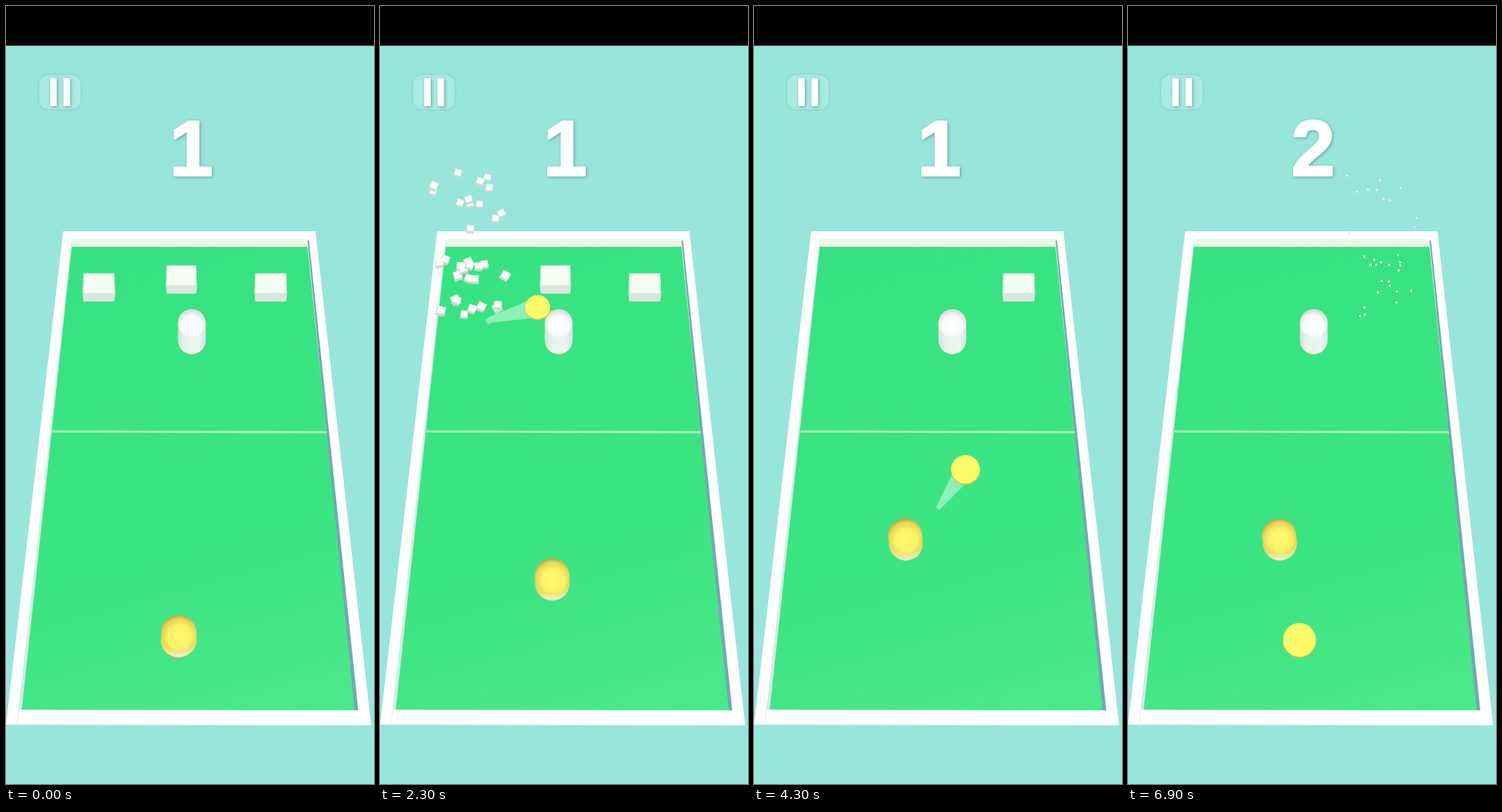
Recreate the animation shown at these times as an HTML page. Size 515x1088 px, loop 7000 ms.

```html
<!DOCTYPE html>
<html lang="en">
<head>
<meta charset="utf-8">
<title>Table game</title>
<style>
  html, body { margin: 0; width: 100%; height: 100%; overflow: hidden; background: #98e5dc; }
  svg { display: block; width: 100vw; height: 100vh; }
  text { font: bold 110px "Liberation Sans", Arial, sans-serif; text-anchor: middle; }
</style>
</head>
<body>
<svg viewBox="0 0 515 1088">
  <defs>
    <linearGradient id="grass" x1="0.4" y1="0" x2="0.6" y2="1">
      <stop offset="0" stop-color="#37e282"/>
      <stop offset="0.65" stop-color="#3be581"/>
      <stop offset="1" stop-color="#49e888"/>
    </linearGradient>
    <linearGradient id="pin">
      <stop offset="0" stop-color="#cfe2d6"/>
      <stop offset="0.22" stop-color="#e8f1eb"/>
      <stop offset="0.75" stop-color="#f0f5f1"/>
      <stop offset="1" stop-color="#d3e6da"/>
    </linearGradient>
    <radialGradient id="cap" cy="0.62" r="0.64">
      <stop offset="0" stop-color="#fff"/>
      <stop offset="0.6" stop-color="#fafafa"/>
      <stop offset="1" stop-color="#cfd6d1"/>
    </radialGradient>
    <linearGradient id="body" x2="0" y2="1">
      <stop offset="0.4" stop-color="#d6c650"/>
      <stop offset="0.8" stop-color="#ece077"/>
      <stop offset="1" stop-color="#f0f2cb"/>
    </linearGradient>
    <radialGradient id="head" cx="0.52" cy="0.62" r="0.66">
      <stop offset="0" stop-color="#fffb70"/>
      <stop offset="0.5" stop-color="#fbf165"/>
      <stop offset="0.78" stop-color="#e3d256"/>
      <stop offset="1" stop-color="#8f9648"/>
    </radialGradient>
    <filter id="soft" x="-30%" y="-30%" width="160%" height="160%">
      <feDropShadow dx="1.2" dy="1.2" stdDeviation="2" flood-color="#456f6b" flood-opacity="0.6"/>
    </filter>
  </defs>

  <rect width="515" height="1088" fill="#98e5dc"/>
  <rect width="515" height="55.500" fill="#000"/>

  <path fill="#fff" d="M80 315H433L511 1006L0 1005Z"/>
  <path fill="#edf8e4" d="M92 326H423V337H92Z"/>
  <path fill="#cdeee5" d="M92 327L93 337L23 984L15 1005Z"/>
  <path fill="#70a8b9" d="M422 328L424 328L493 985H486Z"/>
  <path fill="#fff" d="M18 984L493 985V1005H16Z"/>
  <path fill="url(#grass)" d="M92 336.700H422L488 985L22 984Z"/>
  <path stroke="#a9f0bd" stroke-width="3" d="M65 595L449 596"/>

  <g id="boxes"></g>
  <g id="bits"></g>
  <g id="pinMan">
    <rect x="-19.5" y="424" width="39" height="63" rx="19.5" fill="url(#pin)"/>
    <circle cy="443.5" r="19.3" fill="url(#cap)"/>
  </g>
  <path id="trail" fill="#fff" opacity="0.42"/>
  <g id="ball">
    <ellipse id="rim" fill="#d9bc48"/>
    <ellipse id="disc" fill="#fdfa68"/>
  </g>
  <g id="player">
    <rect x="-24" y="-29.5" width="48" height="59" rx="24" fill="url(#body)"/>
    <ellipse cy="-4.5" rx="24" ry="25" fill="url(#head)"/>
  </g>
  <g id="arrow" fill="#fff" opacity="0.85">
    <path d="M2 -2L54 -4V4L2 2Z"/>
    <path d="M67 0L45 13Q55 0 45 -12Z"/>
  </g>

  <rect x="45.5" y="95.5" width="60" height="50" rx="14" fill="#fff" fill-opacity="0.17"
        stroke="#83cbc3" stroke-opacity="0.5" stroke-width="2"/>
  <g fill="#fff" filter="url(#soft)">
    <rect x="62" y="101" width="9" height="39" rx="1"/>
    <rect x="80.500" y="101" width="9" height="39" rx="1"/>
    <text id="level" x="259" y="237" stroke="#fff" stroke-width="2.500" stroke-linejoin="round">1</text>
  </g>
</svg>
<script>
const LOOP = 7000, STEP = 100, TAIL = 255, LIFE = 1950;
const $ = id => document.getElementById(id);
const set = (el, attrs) => { for (const k in attrs) el.setAttribute(k, attrs[k]); };
const show = (el, on) => { el.style.display = on ? "" : "none"; };
const add = (parent, tag, attrs) => {
  const el = document.createElementNS("http://www.w3.org/2000/svg", tag);
  set(el, attrs);
  return parent.appendChild(el);
};

// Keys are [time, x, y]
const ballKeys = [
  [400, 240, 887], [1050, 437, 695], [1600, 275, 551], [2060, 150, 440],
  [2400, 250, 414], [2800, 362, 506], [3040, 433, 565], [3520, 250, 713],
  [4000, 250, 713], [5000, 403, 498], [5170, 432, 455], [5380, 385, 412],
  [5390, 240, 887]
];
const playerKeys = [
  [250, 242, 881], [600, 241, 802], [3250, 241, 802], [3500, 271, 749],
  [3650, 271, 749], [3950, 212, 746]
];
const pinKeys = [
  [0, 260, 0], [800, 276, 0], [1600, 268, 0], [2300, 250, 0], [2800, 252, 0],
  [3600, 268, 0], [5000, 287, 0], [5600, 297, 0], [6900, 260, 0]
];

function along(keys, t) {
  let i = keys.findIndex(k => k[0] > t);
  if (i < 0) i = keys.length;
  const a = keys[Math.max(i - 1, 0)], b = keys[Math.min(i, keys.length - 1)];
  const u = a === b ? 0 : Math.max(0, (t - a[0]) / (b[0] - a[0]));
  return [a[1] + (b[1] - a[1]) * u, a[2] + (b[2] - a[2]) * u];
}

let seed = 11;
const rand = (lo, hi) => {
  seed = (seed * 16807) % 2147483647;
  return lo + (hi - lo) * seed / 2147483647;
};

const makeBit = (box, i) => {
  const air = i >= 20;
  const el = add($("bits"), "g", {});
  add(el, "rect", { x: -0.5, y: -0.55, width: 1, height: 1.1, fill: "#cbd9d3" });
  add(el, "rect", { x: -0.4, y: -0.55, width: 0.9, height: 0.8, fill: "#f8fdf7" });
  // Floor pieces mostly slide back; a few roll towards the viewer
  const slide = rand(0, 1);
  return {
    el, air,
    x0: rand(-16, 16), y0: rand(-14, 14),
    dx: air ? rand(-75, 60) : rand(-46, 46),
    dy: air ? -rand(120, 225) : -46 + 45 * slide + 50 * slide ** 4,
    spin: rand(-30, 30), size: rand(0.88, 1.08) * (air ? 0.9 : 1)
  };
};

const boxes = [
  { x: 130, y: 374, hit: 2060, drift: -5 },
  { x: 245.5, y: 363, hit: 2400, drift: 6 },
  { x: 370.5, y: 374, hit: 5380, drift: -14 }
].map(box => {
  const { x, y } = box, w = box.hit === 2400 ? 21.5 : 22.5;
  box.el = add($("boxes"), "g", { stroke: "#c6e6d2", "stroke-width": 0.8 });
  add(box.el, "path", { fill: "#dce6dc", d: `M${x - w} ${y + 27}H${x + w}L${x + w - 1} ${y + 39}H${x - w + 1}Z` });
  add(box.el, "path", { fill: "#f5fdf3", d: `M${x - w + 1} ${y}H${x + w - 1}L${x + w} ${y + 28}H${x - w}Z` });
  box.bits = Array.from({ length: 33 }, (_, i) => makeBit(box, i));
  return box;
});

function drawBox(box, t) {
  const age = t - box.hit;
  show(box.el, age < 0);
  for (const b of box.bits) {
    const live = age >= 0 && age < LIFE;
    show(b.el, live);
    if (!live) continue;
    const out = 1 - Math.exp(-age / (b.air ? 200 : 150));
    const x = box.x + b.x0 + (b.dx + box.drift) * out;
    const fall = b.air ? age * age * 3e-5 : 0;
    const y = box.y + 19 + b.y0 * (b.air ? 1 : 1 - out) + b.dy * out + fall;
    const s = 13.5 * b.size * (1 - age / LIFE);
    set(b.el, { transform: `translate(${x} ${y}) rotate(${b.spin}) scale(${s})` });
  }
}

function drawTrail(t) {
  const n = 16, left = [], right = [];
  for (let i = 0; i <= n; i++) {
    const u = i / n, time = t - TAIL * (1 - u);
    const [x, y] = along(ballKeys, time);
    const [px, py] = along(ballKeys, time - 8), [qx, qy] = along(ballKeys, time + 8);
    const len = Math.hypot(qx - px, qy - py);
    if (len < 0.1) continue;
    const half = 3 + 11 * u, nx = (py - qy) / len * half, ny = (qx - px) / len * half;
    left.push(`${x + nx} ${y + ny}`);
    right.unshift(`${x - nx} ${y - ny}`);
  }
  set($("trail"), { d: left.length > 1 ? `M${left.concat(right).join("L")}Z` : "" });
}

function draw(t) {
  boxes.forEach(box => drawBox(box, t));

  const [bx, by] = along(ballKeys, t);
  const inPlay = t < 5380, aiming = t >= 3520 && t < 4000;
  const rx = 18.5 + (by - 505) * 0.0118, ry = rx * (0.97 + (by - 505) * 0.00015);
  show($("ball"), inPlay || t >= 6400);
  show($("trail"), inPlay && !aiming);
  set($("disc"), { cx: bx, cy: by - 0.6, rx, ry });
  set($("rim"), { cx: bx, cy: by + 0.6, rx: rx + 0.3, ry: ry + 0.3 });
  drawTrail(t);

  const [px, py] = along(playerKeys, t), grow = 1 + (py - 770) * 0.0003;
  set($("player"), { transform: `translate(${px} ${py}) rotate(${(px - 257) * 0.13}) scale(${grow} 1)` });
  set($("pinMan"), { transform: `translate(${along(pinKeys, t)[0]} 0)` });

  const angle = Math.atan2(py - by, px - bx) * 180 / Math.PI;
  show($("arrow"), aiming);
  set($("arrow"), { transform: `translate(${bx + 1} ${by + 7}) rotate(${angle + 4})` });

  $("level").textContent = t < 6400 ? "1" : "2";
}

const start = performance.now();
function tick() {
  const t = (performance.now() - start) % LOOP;
  draw(Math.floor(t / STEP) * STEP);
  requestAnimationFrame(tick);
}
tick();
</script>
</body>
</html>
```
